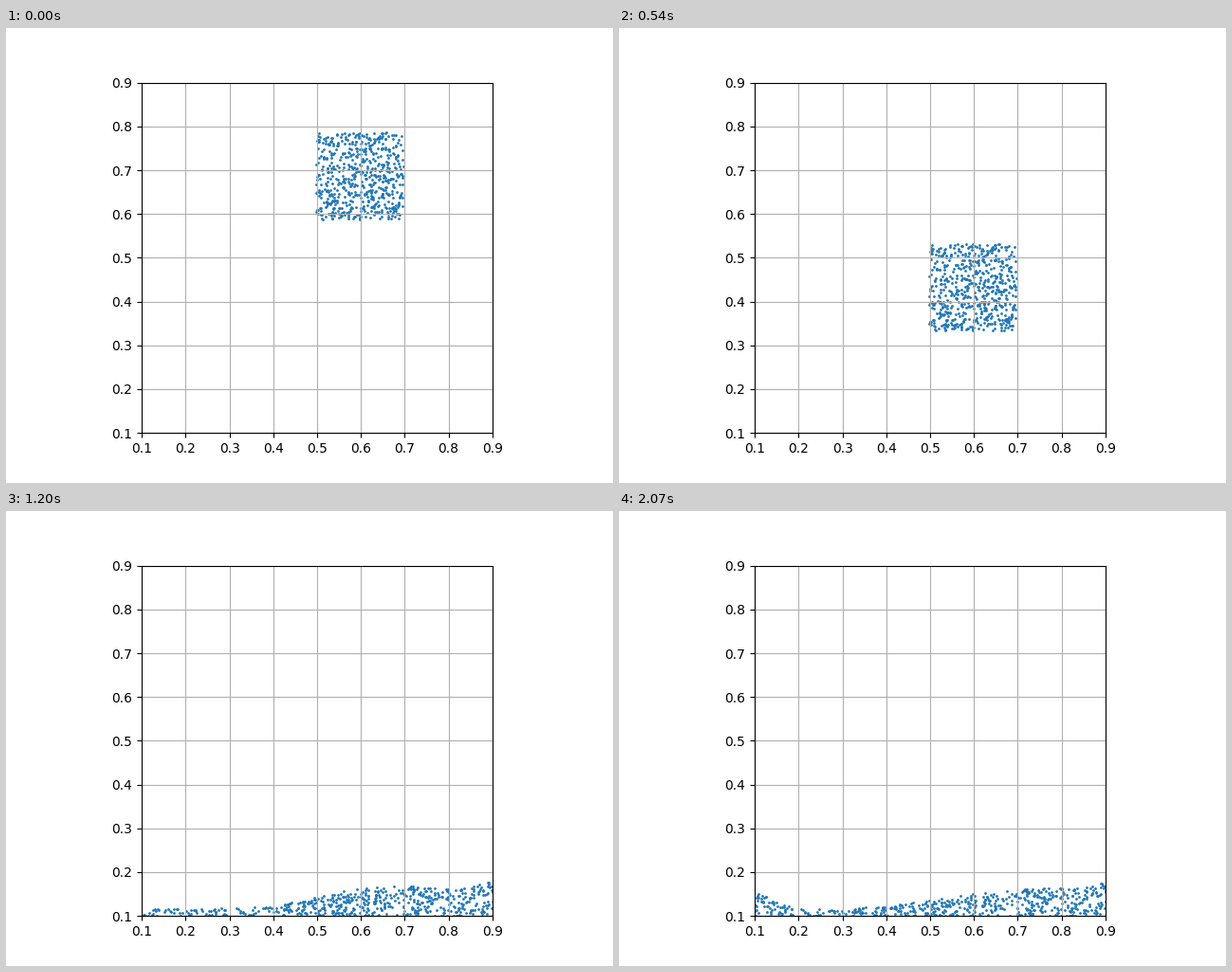
A matplotlib script that plays this animation: 640x480 px, repeating every 2100 ms.

```python
import numpy as np
import matplotlib.pyplot as plt
from matplotlib.animation import FuncAnimation

FRAMES, STEP = 70, 30
N, BLOCK = 600, 30
FLOOR, WALL = 0.094, 0.906
GRAVITY = 7.86e-4
IMPACT = 23

rng = np.random.default_rng(7)
u, v = rng.random((2, N))

# Low and outer particles are thrown farthest to the sides.
order = np.argsort((u - 0.5) * (1.6 - v))
rank, lift = np.empty((2, N))
rank[order] = np.sort(rng.random(N))
for part in order.reshape(-1, BLOCK):
    lift[part[np.argsort(v[part])]] = np.sort(rng.random(BLOCK))


def bump(x, center, width):
    return np.exp(-((x - center) / width)**2)


def falling(n):
    return np.array([0.4965 + 0.2 * u, 0.5875 + 0.199 * v - GRAVITY * n * n])


def landed():
    side = 2 * u - 1
    x = 0.597 + side * (0.102 + 0.04 * (1 - v))
    y = FLOOR + v * (0.189 - 0.018 * side**4)
    return np.array([x, y])


def heap(top, left=FLOOR, base=lambda x: FLOOR + 0 * x):
    """Spread the particles evenly between a base curve and a top curve."""
    x = np.linspace(left, WALL, 800)
    area = np.cumsum(np.maximum(top(x) - base(x), 0))
    px = np.interp(rank, area / area[-1], x)
    return np.array([px, base(px) + lift * (top(px) - base(px))])


def arch_top(x):
    return 0.1 + 0.117 * bump(x, 0.61, 0.22) + 0.03 * bump(x, WALL, 0.06)


def arch_base(x):
    return FLOOR + 0.072 * bump(x, 0.59, 0.07)


def slump_top(x):
    return 0.108 + 0.07 * bump(x, 0.65, 0.22) + 0.05 * bump(x, WALL, 0.08)


def rest_top(x):
    slope = 0.14 - 0.024 * np.cos(np.pi * (x - 0.25) / 0.55)
    return slope + 0.03 * bump(x, FLOOR, 0.06) + 0.016 * bump(x, WALL, 0.04)


times = np.array([IMPACT, 26, 33, 36, 50])
poses = np.array([falling(IMPACT), landed(), heap(arch_top, 0.2, arch_base),
                  heap(slump_top), heap(rest_top)])
slopes = np.diff(poses, axis=0) / np.diff(times)[:, None, None]

# Monotone tangents keep the paths free of overshoot.
tangents = np.zeros_like(poses)
tangents[0, 1] = -2 * GRAVITY * IMPACT
a, b = slopes[:-1], slopes[1:]
same = a * b > 0
tangents[1:-1] = np.where(same, 2 * a * b / np.where(same, a + b, 1), 0)


def positions(n):
    if n <= IMPACT:
        return falling(n)
    if n >= times[-1]:
        return poses[-1]
    k = np.searchsorted(times, n, side="right") - 1
    h = times[k + 1] - times[k]
    t = (n - times[k]) / h
    return ((1 + 2 * t) * (1 - t)**2 * poses[k]
            + t * (1 - t)**2 * h * tangents[k]
            + t * t * (3 - 2 * t) * poses[k + 1]
            + t * t * (t - 1) * h * tangents[k + 1])


fig, ax = plt.subplots(figsize=(6.4, 4.8), dpi=100)
ax.set_aspect("equal")
ax.set(xlim=(0.1, 0.9), ylim=(0.1, 0.9))
ax.grid(True)
dots = ax.scatter(*positions(0), s=1)


def update(n):
    dots.set_offsets(positions(n).T)
    return dots,


anim = FuncAnimation(fig, update, frames=FRAMES, interval=STEP,
                     repeat=True, repeat_delay=0)
plt.show()
```
